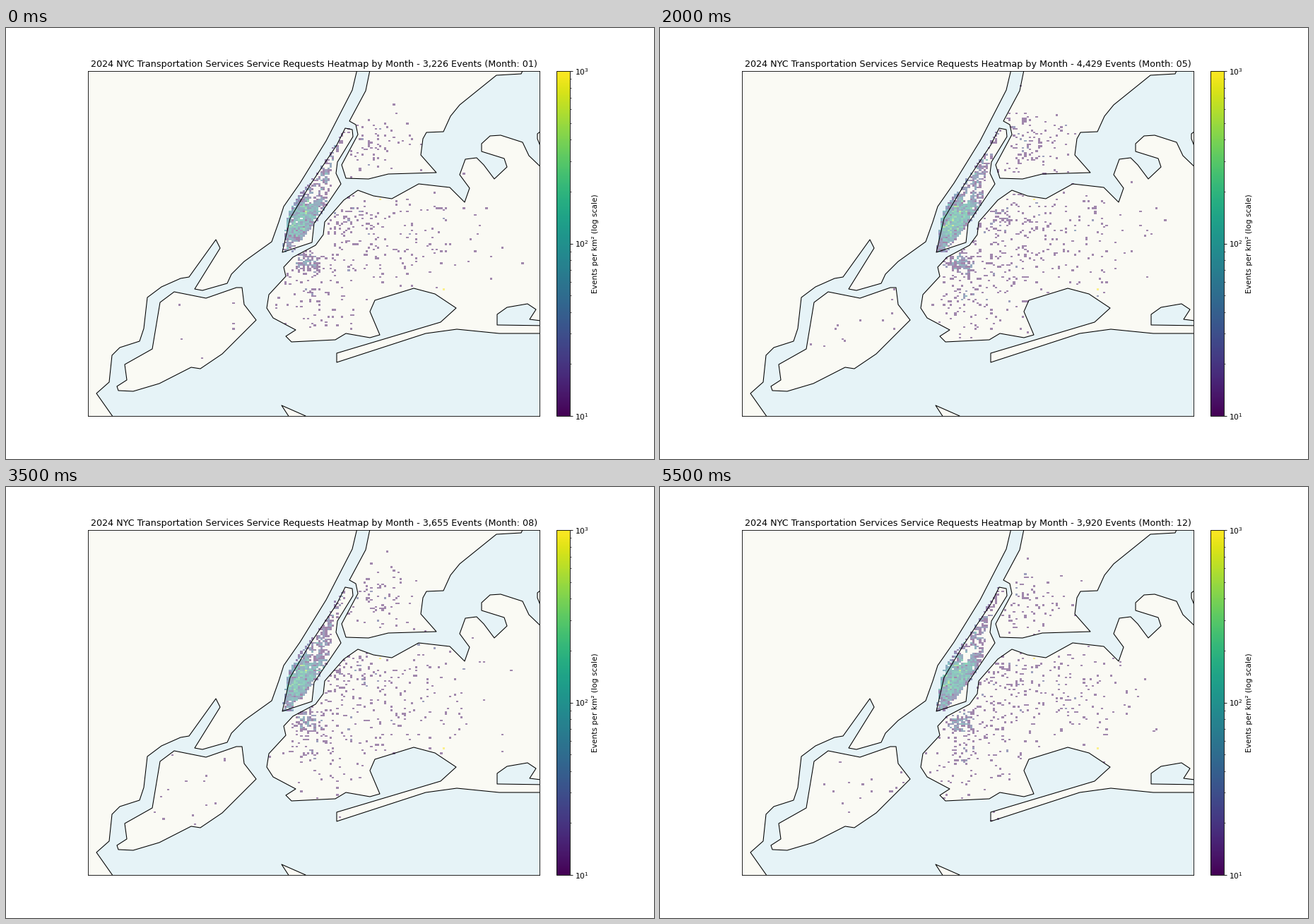
Write a matplotlib script that moves like this. It is 917 by 611 pixels and loops after 6000 ms.

```python
import numpy as np
import matplotlib.pyplot as plt
from matplotlib.animation import FuncAnimation
from matplotlib.cm import ScalarMappable
from matplotlib.colors import LogNorm
from matplotlib.patches import Polygon
from matplotlib.path import Path

W, H, DPI = 917, 611, 64
PT = W / 12 / DPI  # scale so that sizes behave as on a 12 inch wide figure
LEFT, RIGHT, TOP, BOTTOM = 116.4, 754.75, .1 * H, .9 * H
BINS = 200
CELL_AREA = .077  # km²
COUNTS = [3226, 3112, 3340, 3674, 4429, 4019,
          3281, 3655, 4334, 4412, 4068, 3920]

# Key points of the coast in stage pixels; some lie beyond the map's edge.
MAINLAND = [
    (110, 50), (499, 50), (490, 88), (453, 160), (416, 220), (393, 253),
    (386, 275), (376, 303), (337, 331), (319, 349), (313, 362), (278, 372),
    (267, 370), (303, 312), (297, 300), (259, 353), (247, 355), (220, 367),
    (200, 382), (195, 426), (189, 444), (161, 453), (150, 464), (146, 502),
    (128, 518), (154, 555), (110, 560)]
STATEN = [
    (238, 374), (283, 383), (326, 368), (334, 368), (337, 392), (354, 414),
    (306, 462), (275, 483), (262, 481), (217, 504), (180, 515), (159, 514),
    (157, 508), (171, 499), (168, 477), (207, 455), (218, 389)]
MANHATTAN = [
    (480, 142), (490, 144), (491, 154), (469, 190), (467, 206), (474, 221),
    (436, 277), (433, 304), (391, 318), (402, 270), (430, 223), (468, 166)]
BRONX = [
    (517, 50), (509, 89), (486, 132), (495, 137), (498, 151), (475, 194),
    (481, 213), (513, 214), (541, 207), (609, 205), (587, 180), (590, 157),
    (595, 148), (619, 147), (629, 125), (642, 109), (694, 67), (729, 65),
    (736, 50)]
LONG_ISLAND = [
    (765, 205), (740, 181), (731, 162), (700, 152), (685, 153), (673, 164),
    (673, 175), (705, 185), (709, 197), (691, 214), (676, 194), (666, 184),
    (650, 186), (642, 208), (656, 227), (649, 247), (628, 226), (584, 221),
    (546, 242), (520, 238), (498, 230), (478, 244), (451, 275), (449, 293),
    (438, 308), (406, 325), (393, 339), (396, 352), (372, 378), (369, 397),
    (378, 411), (410, 428), (396, 437), (404, 445), (466, 442), (481, 433),
    (515, 439), (529, 435), (515, 402), (522, 386), (577, 369), (607, 377),
    (637, 397), (615, 417), (468, 461), (468, 474), (594, 433), (638, 427),
    (698, 433), (765, 433)]
POINT = [(390, 535), (424, 550), (403, 555)]
ISLET = [(765, 140), (752, 150), (752, 157), (765, 190)]
LAGOON = [(695, 421), (695, 406), (709, 396), (738, 391), (750, 399),
          (741, 413), (765, 416), (765, 422)]
LAND = [MAINLAND, STATEN, MANHATTAN, BRONX, LONG_ISLAND, POINT, ISLET]

# Outer districts: centre x, y, spread x, y, monthly events.
DISTRICTS = [
    (426, 333, 10, 8, 130), (432, 378, 6, 6, 16), (450, 355, 40, 48, 150),
    (480, 268, 28, 18, 85), (560, 300, 60, 42, 170), (517, 165, 30, 24, 100),
    (275, 420, 55, 38, 20)]
AIRPORTS = [(529, 244), (618, 370)]

plt.rcParams.update({
    "font.family": "DejaVu Sans", "font.size": 10 * PT,
    "axes.linewidth": .8 * PT, "axes.titlepad": 6 * PT,
    "axes.labelpad": 4 * PT,
    "ytick.major.size": 3.5 * PT, "ytick.major.width": .8 * PT,
    "ytick.major.pad": 3.5 * PT, "ytick.minor.size": 2 * PT,
    "ytick.minor.width": .6 * PT})

cell_w, cell_h = (RIGHT - LEFT) / BINS, (BOTTOM - TOP) / BINS
X, Y = np.meshgrid(LEFT + cell_w * (np.arange(BINS) + .5),
                   TOP + cell_h * (np.arange(BINS) + .5))
norm = LogNorm(10, 1000)
viridis = plt.get_cmap("viridis")


def bell(value, centre, spread):
    return np.exp(-((value - centre) / spread) ** 2)


def inside(shape):
    points = np.column_stack([X.ravel(), Y.ravel()])
    return Path(shape).contains_points(points).reshape(X.shape)


def manhattan_density():
    """A slanted band, widest and busiest in midtown, with a park left out."""
    middle = 482 - .48 * (Y - 142)
    half_width = 6 + 18 * bell(Y, 255, 45)
    across = (X - middle) / half_width
    rate = 1.4 * np.clip((Y - 140) / 60, 0, 1) + 9 * bell(Y, 273, 25)
    density = rate * bell(across, -.1, .9)
    density[(np.abs(across) > 1) | (Y < 142) | (Y > 318)] = 0
    park = (np.abs(X - middle) < 4) & (np.abs(Y - 237) < 13)
    density[park] *= .05
    return density


def outer_density():
    total = sum(n * cell_w * cell_h / (2 * np.pi * sx * sy)
                * bell(X, cx, sx * 2 ** .5) * bell(Y, cy, sy * 2 ** .5)
                for cx, cy, sx, sy, n in DISTRICTS)
    land = inside(STATEN) | inside(BRONX) | inside(LONG_ISLAND)
    return total * (land & ~inside(LAGOON))


noise = np.random.default_rng(11).lognormal(-.15, .55, X.shape)
EXPECTED = (manhattan_density() + outer_density()) * noise


def heatmap(month):
    rng = np.random.default_rng(2024 + month)
    events = rng.poisson(EXPECTED * COUNTS[month - 1] / 3700)
    for x, y in AIRPORTS:
        events[int((y - TOP) / cell_h), int((x - LEFT) / cell_w)] = 80
    image = viridis(norm(np.maximum(events, 1) / CELL_AREA).clip(0, 1))
    image[..., 3] = np.where(events > 0, .5, 0)
    return image


def add_axes(left, right):
    return fig.add_axes([left / W, 1 - BOTTOM / H,
                         (right - left) / W, (BOTTOM - TOP) / H])


def draw_shape(shape, color):
    ax.add_patch(Polygon(shape, facecolor=color, edgecolor="none", zorder=.5))
    ax.add_patch(Polygon(shape, fill=False, edgecolor="black",
                         linewidth=PT, joinstyle="round", zorder=2))


fig = plt.figure(figsize=(W / DPI, H / DPI), dpi=DPI, facecolor="white")
ax = add_axes(LEFT, RIGHT)
ax.set_facecolor("#e6f3f7")
ax.set_xticks([])
ax.set_yticks([])
for shape in LAND:
    draw_shape(shape, "#fafaf4")
draw_shape(LAGOON, ax.get_facecolor())

images = [heatmap(month) for month in range(1, 13)]
cells = ax.imshow(images[0], extent=(LEFT, RIGHT, BOTTOM, TOP),
                  interpolation="nearest", aspect="auto", zorder=1)
ax.set_xlim(LEFT, RIGHT)
ax.set_ylim(BOTTOM, TOP)
title = ax.set_title("")

bar = fig.colorbar(ScalarMappable(norm, viridis),
                   cax=add_axes(.85 * W, .87 * W))
bar.set_label("Events per km² (log scale)")


def update(frame):
    cells.set_data(images[frame])
    title.set_text("2024 NYC Transportation Services Service Requests Heatmap "
                   f"by Month - {COUNTS[frame]:,} Events (Month: {frame + 1:02d})")
    return cells, title


anim = FuncAnimation(fig, update, frames=12, interval=500, repeat=True,
                     repeat_delay=0, blit=False)
plt.show()
```
